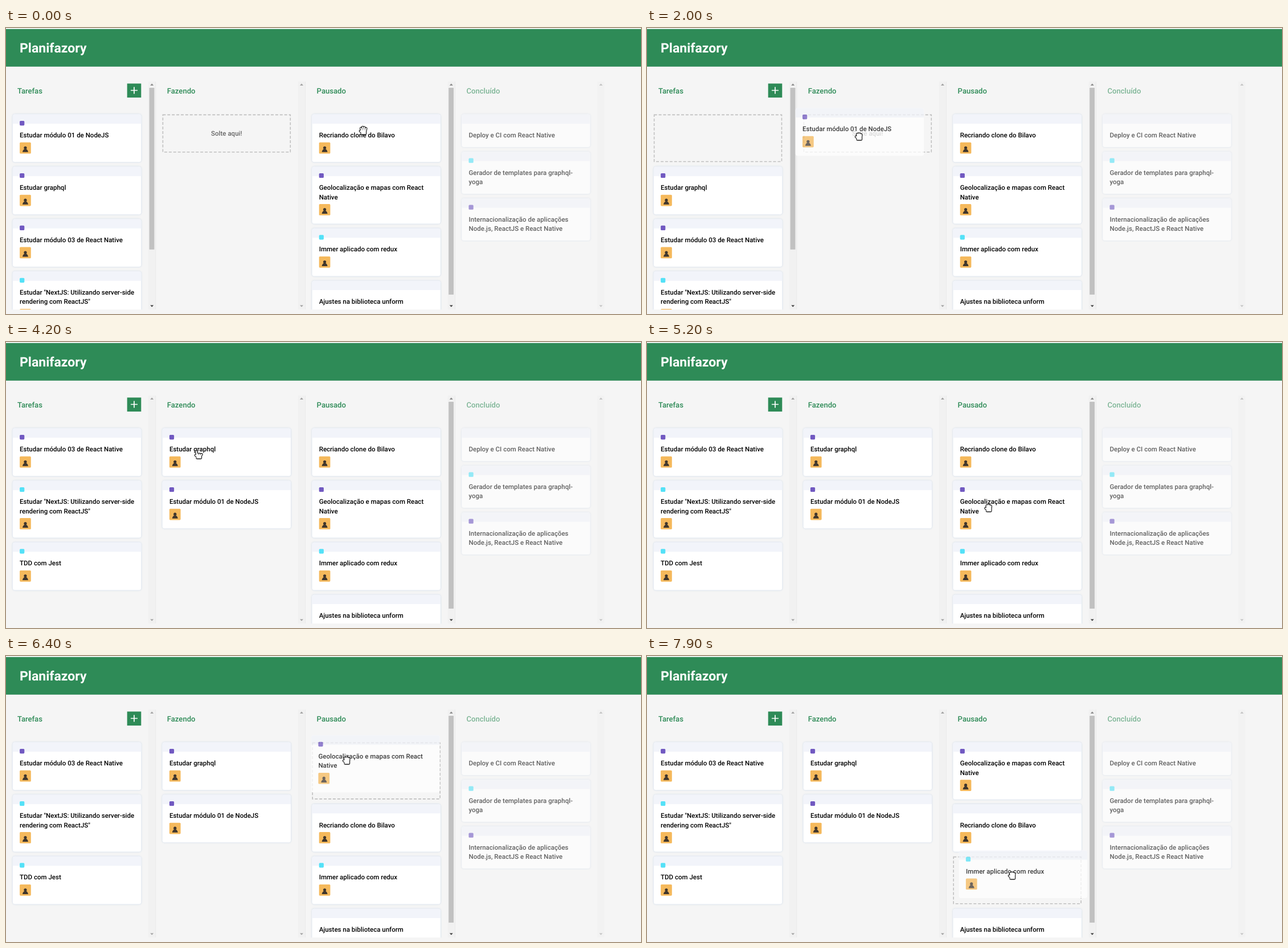
An HTML page that plays this animation: 1115x502 px, repeating every 8000 ms.

```html
<!DOCTYPE html>
<html lang="pt">
<head>
<meta charset="utf-8">
<title>Quadro de tarefas</title>
<style>
html, body { margin: 0; height: 100%; overflow: hidden; background: #f5f5f5; }
svg { display: block; width: 1115px; height: 502px; }
text { font: 500 11.5px Roboto, sans-serif; text-rendering: geometricPrecision; }
.brand { font-size: 23px; font-weight: 700; fill: #fff; }
.title { font-size: 13.1px; fill: #2e8b57; }
.hint { fill: #666; text-anchor: middle; }
.card { filter: drop-shadow(0 .8px 1.5px rgba(192, 208, 230, .9)); }
.slot { fill: none; stroke: #c0c0c0; stroke-width: 1.6; stroke-dasharray: 5 2.9; }
.hand { fill: none; stroke-linecap: round; stroke-linejoin: round; }
</style>
</head>
<body>
<svg viewBox="0 0 1115 502">
  <clipPath id="board"><rect y="70" width="1115" height="424.3"/></clipPath>
  <rect y="1.5" width="1115" height="66.3" fill="#2e8b57"/>
  <rect width="1115" height="1.5" fill="#fff"/>
  <text class="brand" x="24" y="43.3">Planifazory</text>
  <g id="scene"></g>
</svg>
<script>
const STEP = 100, LOOP = 8000;
const PURPLE = '#7159c1', CYAN = '#54e1f7';
const PITCH = 262.8, LEFT = 11.8, TOP = 151.6, WIDTH = 225.5;
const LINE = 16.4, PAD = 12.3, GAP = 8.2, PIC = 19.7;

const card = (text, label, avatar = true) => ({ lines: text.split('|'), label, avatar });
const cards = {
  node: card('Estudar módulo 01 de NodeJS', PURPLE),
  graph: card('Estudar graphql', PURPLE),
  native: card('Estudar módulo 03 de React Native', PURPLE),
  next: card('Estudar "NextJS: Utilizando server-side|rendering com ReactJS"', CYAN),
  jest: card('TDD com Jest', CYAN),
  clone: card('Recriando clone do Bilavo'),
  geo: card('Geolocalização e mapas com React|Native', PURPLE),
  immer: card('Immer aplicado com redux', CYAN),
  unform: card('Ajustes na biblioteca unform', null, false),
  deploy: card('Deploy e CI com React Native', null, false),
  yoga: card('Gerador de templates para graphql-|yoga', CYAN, false),
  intl: card('Internacionalização de aplicações|Node.js, ReactJS e React Native', PURPLE, false)
};
const titles = ['Tarefas', 'Fazendo', 'Pausado', 'Concluído'];

// Pointer moves: first step, last step, destination.
const moves = [
  [800, 800, 121, 207], [1100, 2100, 382, 189.4], [2700, 3000, 107.5, 198.5],
  [3700, 3900, 357, 210], [4200, 4200, 338, 198], [4400, 4500, 540, 226],
  [4700, 5000, 599.5, 291], [5500, 5700, 598, 243.7], [5900, 6400, 598, 183],
  [6700, 7200, 631, 401], [7500, 7900, 641, 385]
];
// The dragged copy hangs at (dx, dy) from the pointer.
const drags = [
  { id: 'node', start: 1100, drop: 2300, end: 2400, dx: 111.3, dy: 49.5 },
  { id: 'graph', start: 3700, drop: 3900, end: 4200, dx: 95, dy: 44 },
  { id: 'geo', start: 5500, drop: 6700, end: 6700, dx: 61.9, dy: 43.7 },
  { id: 'immer', start: 7500, drop: LOOP, end: LOOP, dx: 93.4, dy: 43.8 }
];

function pointer(t) {
  let x = 627, y = 180;
  for (const [from, to, mx, my] of moves) {
    const p = Math.min(1, Math.max(0, (t - from + STEP) / (to - from + STEP)));
    const eased = 1 - (1 - p) ** 1.36;
    x += (mx - x) * eased;
    y += (my - y) * eased;
  }
  return [x, y];
}

const rect = (x, y, w, h, fill, r = 0) =>
  `<rect x="${x}" y="${y}" width="${w}" height="${h}" rx="${r}" fill="${fill}"/>`;
const slot = (x, y, h) =>
  `<rect class="slot" x="${x + .8}" y="${y + .8}" width="${WIDTH - 1.6}" height="${h - 1.6}"/>`;
const height = c => LINE * (1 + c.lines.length) + 2 * PAD + (c.avatar ? PIC + 6.6 : 0);

function avatar(y) {
  return rect(PAD, y, PIC, PIC, '#f5b95c', 1.6) +
    `<g transform="translate(${PAD + PIC / 2} ${y})" fill="#40362c">` +
    '<circle cy="9.5" r="2.6"/><path d="M-5 17Q-4 11.5 0 11.5T5 17Z"/></g>';
}

function drawCard(c, x, y, cls = 'card') {
  const base = LINE + PAD + 12;
  return `<g transform="translate(${x} ${y})"><g class="${cls}">` +
    rect(0, 0, WIDTH, height(c), '#fff', 4) + '</g>' +
    `<path d="M0 ${LINE}V4Q0 0 4 0H${WIDTH - 4}Q${WIDTH} 0 ${WIDTH} 4V${LINE}Z" fill="#f2f4fa"/>` +
    (c.label ? rect(PAD, 11.4, 8.2, 8.2, c.label, 1.6) : '') +
    c.lines.map((s, i) => `<text x="${PAD}" y="${base + LINE * i}">${s}</text>`).join('') +
    (c.avatar ? avatar(PAD + 4.1 + LINE * (1 + c.lines.length)) : '') + '</g>';
}

function scrollbar(x, content) {
  const track = 376, view = 409, thumb = track * view / (content + 66), active = thumb < track;
  const arrow = (y, d, fill) => `<path d="M${x + 3.2} ${y}h6l-3 ${d}z" fill="${fill}"/>`;
  return rect(x, 94, 12.4, 400, '#f1f1f1') +
    arrow(101, -3.4, active ? '#8a8a8a' : '#a3a3a3') +
    arrow(486.4, 3.4, active ? '#404040' : '#a3a3a3') +
    (active ? rect(x + 1.6, 105, 8.8, thumb, '#c1c1c1') : '');
}

function lists(t) {
  const todo = ['node', 'graph', 'native', 'next', 'jest'], doing = [];
  for (const { drop } of drags.slice(0, 2)) if (t >= drop) doing.unshift(todo.shift());
  const paused = t < 6100 ? ['clone', 'geo'] : ['geo', 'clone'];
  return [todo, doing, [...paused, 'immer', 'unform'], ['deploy', 'yoga', 'intl']];
}

function column(ids, i, held) {
  const x = LEFT + PITCH * i;
  let y = TOP, out = `<text class="title" x="${20 + PITCH * i}" y="114.8">${titles[i]}</text>`;
  if (i == 0) out += rect(212.7, 97.5, 24.6, 24.6, '#2e8b57') +
    '<path d="M219 109.5H231M225 103.5V115.5" stroke="#fff" stroke-width="1.7"/>';
  if (!ids.length) out += slot(x, y, 67) + `<text class="hint" x="${x + WIDTH / 2}" y="189">Solte aqui!</text>`;
  for (const id of ids) {
    const c = cards[id], h = height(c);
    out += id == held ? slot(x, y, h) : drawCard(c, x, y);
    y += h + GAP;
  }
  out += scrollbar(250 + PITCH * i, y - TOP);
  return `<g opacity="${i == 3 ? .6 : 1}">${out}</g>` +
    (i ? rect(PITCH * i - .3, 94, .8, 400, 'rgba(0,0,0,.06)') : '');
}

// Four fingers, given by the heights of their tips, and a thumb.
function hand([x, y], tips, lean) {
  const fingers = tips.map((tip, i) => {
    const fx = 2.1 * i - 2.4;
    return `M${fx} 5.5V2L${fx + lean * (i - 1.5)} ${tip}`;
  });
  const d = fingers.join('') + 'M-1.5 4L-5 .8';
  return `<g class="hand" transform="translate(${x} ${y})">` +
    `<path d="${d}" stroke="#000" stroke-width="4.4"/><path d="${d}" stroke="#fff" stroke-width="2.3"/></g>`;
}

function scene(t) {
  const drag = drags.find(d => t >= d.start && t < d.end);
  const held = drag && t < drag.drop ? drag.id : null;
  const [x, y] = pointer(t);
  let out = '<g clip-path="url(#board)">' + lists(t).map((ids, i) => column(ids, i, held)).join('') + '</g>';
  if (drag) out += `<g opacity=".75">${drawCard(cards[drag.id], x - drag.dx, y - drag.dy, '')}</g>`;
  if (drag || (t >= 5200 && t < 5500)) return out + hand([x, y], [-3.8, -4.5, -4.2, -3], .3);
  return out + (t < 800 ? hand([x, y], [-4.2, -6, -5.6, -3.8], .9) : hand([x, y], [-6, -1.6, -1.4, -.8], 1.1));
}

const stage = document.getElementById('scene');
let shown = -1;
function tick() {
  const t = Math.floor(performance.now() % LOOP / STEP) * STEP;
  if (t != shown) stage.innerHTML = scene(shown = t);
  requestAnimationFrame(tick);
}
tick();
</script>
</body>
</html>
```
